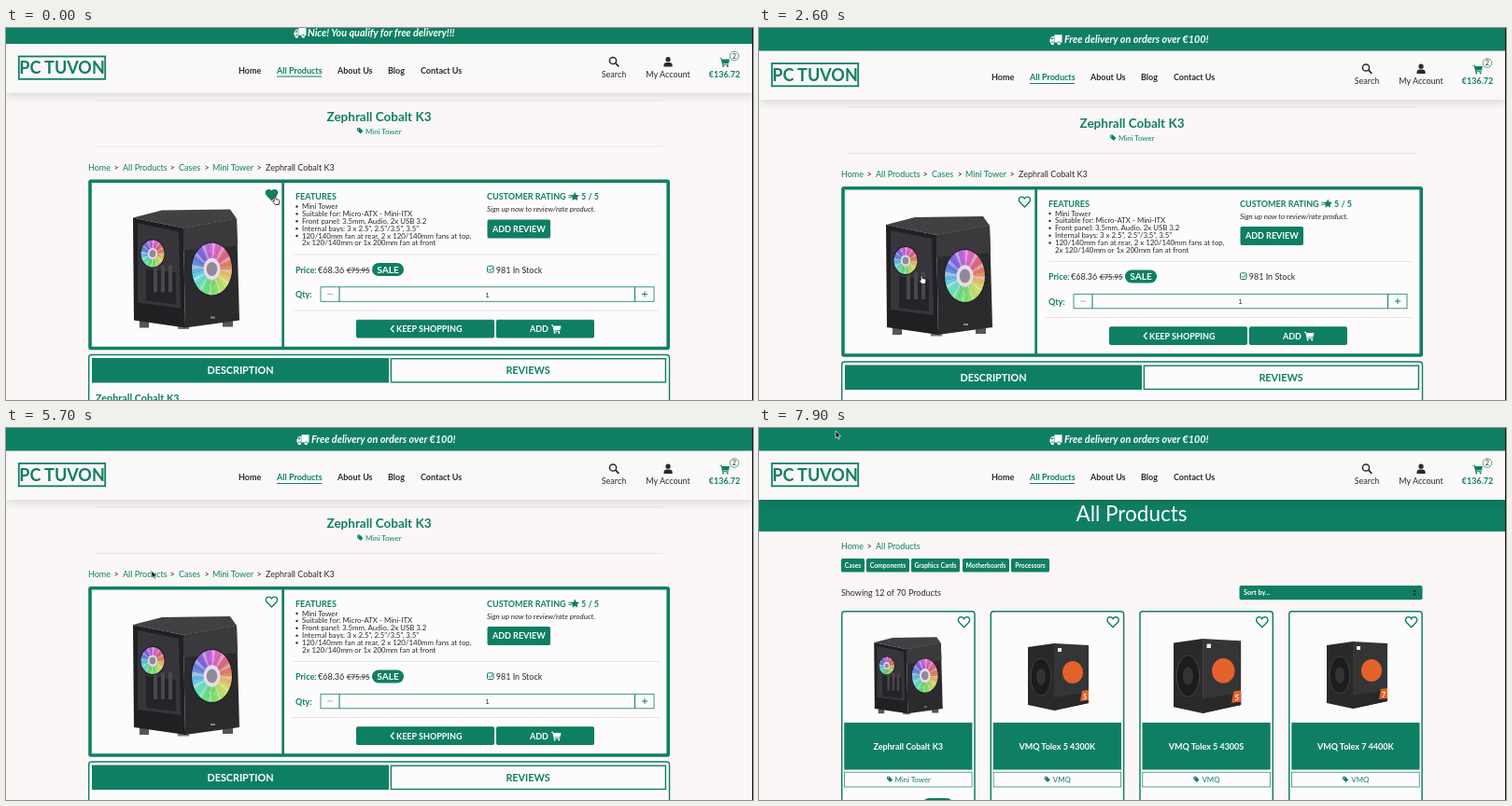
An HTML page that plays this animation: 800x399 px, repeating every 8000 ms.

```html
<!DOCTYPE html>
<html lang="en">
<head>
<meta charset="utf-8">
<title>Shop walkthrough</title>
<style>
  html, body { margin: 0; height: 100%; overflow: hidden; background: #faf7f6; }
  svg { display: block; width: 100vw; height: 100vh; }
  text { font-family: Lato, sans-serif; fill: #2b2b2b; white-space: pre; }
  .b { font-weight: 700; }
  .i { font-style: italic; }
  .m { text-anchor: middle; }
  .g { fill: #0f7f63; }
  .w { fill: #fff; }
  .arial { font-family: "Liberation Sans", sans-serif; }
  .lift { transform: translateY(-1px); filter: drop-shadow(0 2px 4px #0007); }
  #bar { filter: drop-shadow(0 3px 5px #0002); }
  #alert { filter: drop-shadow(0 5px 8px #0006); }
</style>
</head>
<body>
<svg id="stage" viewBox="0 0 800 399"></svg>
<script>
const GREEN = '#0f7f63', PAPER = '#fdfbfc', BG = '#faf7f6', INK = '#2b2b2b';
const SHOP = 'PC TUVON', CASE = 'Zephrall Cobalt K3', MAKER = 'VMQ';

// Drawing helpers
const text = (x, y, s, cls = '', size = 9) =>
  `<text x="${x}" y="${y}" class="${cls}" font-size="${size}">${s}</text>`;
const rect = (x, y, x2, y2, fill, stroke = 'none', width = 1, r = 0) =>
  `<rect x="${x}" y="${y}" width="${x2 - x}" height="${y2 - y}" fill="${fill}" stroke="${stroke}" stroke-width="${width}" rx="${r}"/>`;
const poly = (points, fill, extra = '') => `<polygon points="${points}" fill="${fill}" ${extra}/>`;
const rule = (x, x2, y, color = '#e3e0e0', width = 0.8) =>
  `<path d="M${x} ${y}H${x2}" stroke="${color}" stroke-width="${width}"/>`;
const ellipse = (x, y, rx, ry, fill, extra = '') =>
  `<ellipse cx="${x}" cy="${y}" rx="${rx}" ry="${ry}" fill="${fill}" ${extra}/>`;
const group = (id, body, extra = '') => `<g id="${id}" ${extra}>${body}</g>`;
const place = (x, y, scale, body) => `<g transform="translate(${x} ${y}) scale(${scale})">${body}</g>`;

// Icons live in a 16 unit square
const ICONS = {
  heart: 'M8 14.5L1.7 8C-1 4.5 1 1 4.2 1C6 1 7.4 2.2 8 3.2C8.6 2.2 10 1 11.8 1C15 1 17 4.5 14.3 8Z',
  tag: 'M0 1v6l8 8q1 1 2 0l5-5q1-1 0-2L7 0H1Q0 0 0 1M3.5 2a1.5 1.5 0 1 1 0 3a1.5 1.5 0 1 1 0-3',
  truck: 'M6 1h10v10H6zM0 11V7l2.5-4H5.3v8zM1.3 7H4V4.2H3zM3.4 10a2.2 2.2 0 1 1 0 4.4a2.2 2.2 0 1 1 0-4.4M12 10a2.2 2.2 0 1 1 0 4.4a2.2 2.2 0 1 1 0-4.4',
  cart: 'M0 1h3l.5 2H16l-1.6 6.8H5.3l.3 1.4H14v1.4H4.2L2 2.5H0zM5.5 13a1.5 1.5 0 1 1 0 3a1.5 1.5 0 1 1 0-3M12.5 13a1.5 1.5 0 1 1 0 3a1.5 1.5 0 1 1 0-3',
  user: 'M8 0a4 4 0 1 1 0 8a4 4 0 1 1 0-8M1 16v-2q0-5 5-5h4q5 0 5 5v2z',
  star: 'M8 0l2.4 5 5.6.8-4 3.9 1 5.6-5-2.7-5 2.7 1-5.6-4-3.9 5.6-.8z',
};
const icon = (name, x, y, size, fill = GREEN, extra = '') =>
  place(x, y, size / 16, `<path d="${ICONS[name]}" fill="${fill}" fill-rule="evenodd" ${extra}/>`);
const heart = (x, y, id = '') => icon('heart', x - 6.5, y - 6, 13, PAPER, `id="${id}" stroke="${GREEN}" stroke-width="1.7"`);

// Products
function fan(x, y, rx, ry) {
  let out = ellipse(x, y, rx + 1, ry + 1, '#1b1b1d');
  const n = 36, at = a => `${Math.cos(a).toFixed(3)},${Math.sin(a).toFixed(3)}`;
  let blades = '';
  for (let k = 0; k < n; k++) {
    const a = k / n * 2 * Math.PI;
    blades += poly(`0,0 ${at(a)} ${at(a + 0.19)}`, `hsl(${(k * 10 + 30) % 360} ${k % 3 ? 68 : 50}% ${k % 3 ? 64 : 76}%)`);
  }
  out += `<g transform="translate(${x} ${y}) scale(${rx} ${ry})">${blades}</g>`;
  return out + ellipse(x, y, rx * 0.42, ry * 0.42, '#e8dcec') + ellipse(x, y, rx * 0.27, ry * 0.27, '#8f8a98');
}
const tower =
  rect(143, 319, 153, 329, '#555') + rect(184, 325, 196, 330.5, '#777') + rect(232, 319, 243, 328, '#555') +
  poly('136,211 167,203 240,202 247,212 190,222', '#414144') +
  poly('136,211 190,222 192,329 137,321', '#202023') +
  poly('141,217 185,226 187,308 141,302', '#37353a') +
  poly('150,266 182,270 182,304 150,300', '#242327') +
  [158, 166, 174].map(x => rect(x, 262, x + 4, 291, '#49474c')).join('') +
  fan(157, 249.5, 12.5, 14.5) +
  poly('190,222 247,212 250,321 192,329', '#2b2b2e') +
  poly('190,222 247,212 248,241 190,246', '#3a3a3d') +
  fan(220.5, 266, 21.5, 28) +
  rect(219, 317, 224, 319, '#888');

const chipBox = tier =>
  poly('0,4 28,0 28,72 0,66', '#29292b') +
  ellipse(14, 36, 11, 20, '#1c1c1e', 'stroke="#404043"') + ellipse(14, 36, 5, 9, '#333336') +
  poly('28,0 65,2 65,64 28,72', '#353537') + poly('28,58 65,52 65,64 28,72', '#28282a') +
  ellipse(48, 31, 11, 12, '#e2622b') + rect(32, 5, 36, 9, '#eee') +
  poly('58,51 65,50 65,61 56,62', '#e2622b') + text(61, 59.5, tier, 'b m w', 7);

// Shared header
const nav = [[249, 'Home'], [290, 'All Products'], [355, 'About Us'], [409, 'Blog'], [444, 'Contact Us']];
const header =
  group('bar', rect(0, 24, 800, 77, '#fbf9f8')) +
  rect(0, 0, 800, 24.5, GREEN) +
  group('freeBanner', icon('truck', 311.5, 6.5, 13, '#fff') + text(327, 16, 'Free delivery on orders over €100!', 'b i w', 10.8)) +
  group('niceBanner', icon('truck', 308.5, 6.5, 13, '#fff') + text(323, 16, 'Nice! You qualify for free delivery!!!', 'b i w', 10.8)) +
  rect(13.8, 38, 106.2, 62.3, 'none', GREEN, 1.8) + text(60, 56.5, SHOP, 'b m g', 18) +
  nav.map(([x, s], k) => text(x, 56, s, 'b', 9).replace('<text', k === 1 ? '<text id="activeNav"' : '<text')).join('') +
  group('underline', rule(290, 338, 59.5, GREEN, 1)) +
  `<circle cx="650" cy="42.5" r="3.6" fill="none" stroke="${INK}" stroke-width="1.5"/><path d="M652.7 45.2l3.6 3.6" stroke="${INK}" stroke-width="1.8"/>` +
  text(651, 60, 'Search', 'm') + icon('user', 703.8, 38.5, 10.5, INK) + text(709, 60, 'My Account', 'm') +
  icon('cart', 764.5, 39, 10.5) + ellipse(780, 37.5, 4.8, 4.8, BG, `stroke="${GREEN}" stroke-width=".7"`) +
  text(780, 40, '2', 'm', 6.8) + text(769.5, 60, '€136.72', 'b m g');

const crumbs = (y, items) => items.map(([x, s, cls = 'g']) => text(x, y, s, cls)).join('');

// Catalogue page
const CARD_X = [88.7, 248.3, 408, 567.8];
const names = [CASE, ...['5 4300K', '5 4300S', '7 4400K'].map(s => `${MAKER} Tolex ${s}`)];
const pictures = [
  place(35.5, 94, 0.645, tower),
  place(288, 231, 1, chipBox(5)),
  place(444, 226, 1.11, chipBox(5)),
  place(608, 229, 1, chipBox(7)),
];
const card = (x, k) => group('card' + k,
  rect(x, 196.7, x + 142.3, 430, PAPER, GREEN, 1.5, 3) + pictures[k] + heart(x + 130.8, 208) +
  rect(x + 2.5, 316, x + 139.7, 366.5, GREEN) + text(x + 71, 344.5, names[k], 'b m w') +
  rect(x + 2.8, 369.2, x + 139.4, 385, 'none', GREEN, 0.7) +
  (k ? icon('tag', x + 57.3, 373.8, 6.2) + text(x + 66.5, 380, MAKER, 'g', 7.9)
     : icon('tag', x + 48.3, 373.8, 6.2) + text(x + 56.7, 380, 'Mini Tower', 'g', 7.9) + rect(175, 397, 208, 411, GREEN, 'none', 0, 7)));
const chips = [[88, 113, 'Cases'], [115, 161, 'Components'], [163, 215, 'Graphics Cards'], [218, 268, 'Motherboards'], [270, 311, 'Processors']];
const catalogue =
  rect(0, 77, 800, 111, GREEN) + text(399, 100.3, 'All Products', 'm w', 22.5) +
  crumbs(130, [[88, 'Home'], [115.5, '&gt;', ''], [125, 'All Products']]) +
  chips.map(([x, x2, s]) => rect(x, 140, x2, 154.5, GREEN, 'none', 0, 1.5) + text((x + x2) / 2, 149.6, s, 'b m w', 6.75)).join('') +
  text(88, 180, 'Showing 12 of 70 Products') +
  rect(514.5, 169, 710.5, 184.3, GREEN, 'none', 0, 2) + text(519, 179.2, 'Sort by...', 'b w', 7.3) +
  poly('700,176 702,173.2 704,176', INK) + poly('700,177.5 702,180.3 704,177.5', INK) +
  CARD_X.map(card).join('');

// Product page
const button = (id, x, y, x2, y2, body) =>
  group(id, rect(x, y, x2, y2, GREEN, GREEN, 1, 1) + body);
const features = ['Mini Tower', 'Suitable for: Micro-ATX - Mini-ITX', 'Front panel: 3.5mm, Audio, 2x USB 3.2',
  'Internal bays: 3 x 2.5", 2.5"/3.5", 3.5"', '120/140mm fan at rear, 2 x 120/140mm fans at top,', '2x 120/140mm or 1x 200mm fan at front'];
const product =
  rule(96, 703, 85) + text(399.5, 107, CASE, 'b m g', 13.5) +
  icon('tag', 376, 114.5, 6.5) + text(385, 121, 'Mini Tower', 'g', 7.9) + rule(96, 703, 134.5) +
  crumbs(160, [[88, 'Home'], [115.5, '&gt;', ''], [125, 'All Products'], [175.5, '&gt;', ''], [185, 'Cases'], [212.5, '&gt;', ''],
    [221, 'Mini Tower'], [268.5, '&gt;', ''], [278, CASE, '']]) +
  rect(90, 171.7, 709.2, 351, PAPER, GREEN, 3.6, 1) + rect(295.3, 172, 298, 351, GREEN) +
  tower + heart(284.5, 186.3, 'wish') +
  text(310, 191.5, 'FEATURES', 'b g') +
  features.map((s, k) => text(317, 201.5 + k * 7.875, s, '', 7.875) + (k < 5 ? ellipse(311.5, 199 + k * 7.875, 1.2, 1.2, INK) : '')).join('') +
  text(515, 191.5, 'CUSTOMER RATING =', 'b g') + icon('star', 604.5, 183.5, 9.5) + text(616, 191.5, '5 / 5', 'b g') +
  text(515, 204.5, 'Sign up now to review/rate product.', 'i', 7.875) +
  button('review', 516, 213.5, 582.5, 232.5, text(549.3, 226.3, 'ADD REVIEW', 'b m w')) +
  rule(308, 700, 250.5) +
  text(310, 270, 'Price:', 'b g') + text(334, 270, '€68.36') + text(365, 270, '€75.95', '', 7.875) + rule(364.5, 389.5, 267, INK, 0.7) +
  rect(392, 259.5, 426, 273.5, GREEN, 'none', 0, 7) + text(409, 270.2, 'SALE', 'b m w', 10.1) +
  rect(515.5, 262.8, 522, 269.5, 'none', GREEN, 1, 1) + `<path d="M517 266l1.5 1.6 3-3.3" fill="none" stroke="${GREEN}"/>` + text(524.7, 270, '981 In Stock') +
  text(310, 296.5, 'Qty:', 'b g') + rect(337, 285.3, 694, 300.8, 'none', GREEN, 0.8) +
  `<path d="M357 285v16M673.5 285v16M681 293h6M684 290v6" stroke="${GREEN}"/>` + rule(344, 350, 293, '#8aa') +
  text(515.5, 296, '1', 'm arial', 7.5) + rule(306, 700, 310.5) +
  button('keep', 375.5, 320.8, 522.5, 339.5, '<path d="M415.5 326.5l-3.3 3.7 3.3 3.7" fill="none" stroke="#fff" stroke-width="1.3"/>' + text(418, 333.5, 'KEEP SHOPPING', 'b w')) +
  button('add', 525.5, 320.8, 629.5, 339.5, text(561, 333.5, 'ADD', 'b w') + icon('cart', 584, 325, 10.5, '#fff')) +
  rect(88.7, 358, 710.5, 440, PAPER, GREEN, 1.4, 3) +
  rect(92, 361.5, 410, 388, GREEN) + text(251, 378.5, 'DESCRIPTION', 'b m w', 10.8) +
  rect(412.4, 362.2, 706.4, 387.4, PAPER, GREEN, 1.4) + text(559, 378.5, 'REVIEWS', 'b m g', 10.8) +
  text(96, 408, CASE, 'b g', 10.8);

// Sign in page
const signIn =
  text(399.5, 119, 'Sign In', 'm g', 18) + rule(248, 551, 132, GREEN, 0.8) +
  text(248, 151, 'If you have not created an account yet, then please <tspan class="b g">Sign Up</tspan> first.') +
  rect(248.7, 163.7, 550.4, 183, 'none', GREEN, 1.5) + rect(248.7, 193, 550.4, 212.3, 'none', GREEN, 1.5) +
  text(256, 176.5, 'Ottik482', 'arial', 7.4) + rect(255.2, 168, 256, 179, INK) +
  Array.from({ length: 9 }, (_, k) => ellipse(257.2 + k * 2.55, 203.7, 1, 1, INK)).join('') +
  rect(248.4, 224.4, 254.8, 231, '#fff', '#777', 0.7, 1) + text(259, 231.3, 'Remember Me') +
  rect(249, 244.3, 287.3, 264, GREEN, 'none', 0, 1) + text(268, 257.3, 'Sign In', 'm w') +
  rect(291, 244.3, 372, 264, GREEN, 'none', 0, 1) + text(331.5, 257.3, 'Forgot Password?', 'm w');

const alertBox =
  poly('764,77.5 769,71.5 774,77.5', '#1a9ab8') + rect(600.5, 77, 790.5, 134, '#fff') + rect(600.5, 77, 790.5, 97.5, '#1a9ab8') +
  text(607, 90.2, 'ALERT!', 'b w', 7.875) + '<path d="M777.5 84.5l5 5M782.5 84.5l-5 5" stroke="#fff" stroke-width="1.3"/>' +
  text(607, 113, 'You will need to Sign Up or Login to add Products to', '', 7.875) + text(607, 124, 'Wislist.', '', 7.875);

const cursor =
  group('hand', '<path d="M-.8 5V.8Q0-.5.9.8V3.5l3 .7q1.2.4 1 1.8l-.7 3.5H.3L-2.4 6q.3-1.3 1.6-.2z" fill="#fff" stroke="#111" stroke-width=".8"/>') +
  group('arrow', '<path d="M0 0v8l1.8-1.7 1.3 2.8 1.3-.6-1.3-2.7h2.5z" fill="#111" stroke="#fff" stroke-width=".7"/>');

document.getElementById('stage').innerHTML = rect(0, 0, 800, 399, BG) +
  group('view', group('catalogue', catalogue) + group('product', product) + group('signIn', signIn) + header) +
  group('alert', alertBox) + rect(799, 0, 800, 399, '#1a1a1a') + group('cursor', cursor);

// Timeline: [ms, page] and cursor stops [ms, x, y]
const PAGES = [[0, 'product'], [400, 'catalogue'], [2600, 'product'], [3900, 'signIn'], [5400, 'product'], [7000, 'catalogue']];
const STOPS = [[0, 288, 180], [500, 288, 180], [1100, 768, 116], [1200, 768, 116], [1800, 343, 235], [2100, 270, 268],
  [2400, 174, 265], [2800, 174, 265], [3100, 506, 238], [3200, 506, 238], [3700, 532, 226], [4000, 532, 226],
  [4700, 412, 168], [4900, 74, -14], [5699, 74, -14], [5700, 156, 153], [6200, 548, 222], [6500, 518, 324],
  [6700, 427, 332], [7100, 427, 332], [7900, 82, 3], [8000, 82, 3]];
const BUTTONS = { review: [516, 213, 583, 233], keep: [375, 320, 523, 340], add: [525, 320, 630, 340] };
const LINKS = {
  catalogue: [[88, 140, 311, 155]],
  product: [[91, 173, 295, 350], ...Object.values(BUTTONS)],
  signIn: [[249, 244, 372, 264]],
};

const $ = id => document.getElementById(id);
const show = (id, on) => { $(id).style.display = on ? '' : 'none'; };
const smooth = u => u * u * (3 - 2 * u);
const inside = ([x, y], [l, t, r, b]) => x >= l && x <= r && y >= t && y <= b;

function cursorAt(t) {
  const k = STOPS.findIndex(s => s[0] > t);
  const [t0, x0, y0] = STOPS[k - 1], [t1, x1, y1] = STOPS[k];
  const u = smooth((t - t0) / (t1 - t0));
  return [x0 + (x1 - x0) * u, y0 + (y1 - y0) * u];
}

function setButton(id, hot) {
  const [box, ...content] = $(id).children, color = hot ? GREEN : '#fff';
  box.setAttribute('fill', hot ? PAPER : GREEN);
  box.setAttribute('stroke-width', hot ? 1.3 : 1);
  box.style.transform = hot ? 'scale(1.02, 1.1)' : '';
  box.style.transformBox = 'fill-box';
  box.style.transformOrigin = 'center';
  for (const el of content) {
    if (el.tagName === 'text') el.style.fill = color;
    else if (el.tagName === 'path') el.style.stroke = color;
    else el.firstChild.style.fill = color;
  }
}

function render(t) {
  const page = PAGES.filter(p => p[0] <= t).pop()[1];
  const spot = cursorAt(t), first = t < 400;
  for (const id of ['catalogue', 'product', 'signIn']) show(id, id === page);
  $('view').setAttribute('transform', `translate(0 ${first ? -7.5 : 0})`);
  show('niceBanner', first);
  show('freeBanner', !first);
  show('underline', page !== 'signIn');
  $('activeNav').style.fill = page === 'signIn' ? INK : GREEN;
  $('wish').setAttribute('fill', first ? GREEN : PAPER);
  show('alert', t >= 400 && t < 2600);
  $('alert').style.opacity = Math.min(1, (t - 400) / 300);

  const cards = CARD_X.map(x => page === 'catalogue' && inside(spot, [x, 197, x + 143, 399]));
  cards.forEach((hot, k) => $('card' + k).classList.toggle('lift', hot));
  for (const id in BUTTONS) setButton(id, page === 'product' && inside(spot, BUTTONS[id]));

  const link = cards.includes(true) || LINKS[page].some(box => inside(spot, box));
  show('hand', link);
  show('arrow', !link);
  $('cursor').setAttribute('transform', `translate(${spot})`);
}

function tick(now) {
  render(now % 8000);
  requestAnimationFrame(tick);
}
render(0);
requestAnimationFrame(tick);
</script>
</body>
</html>
```
